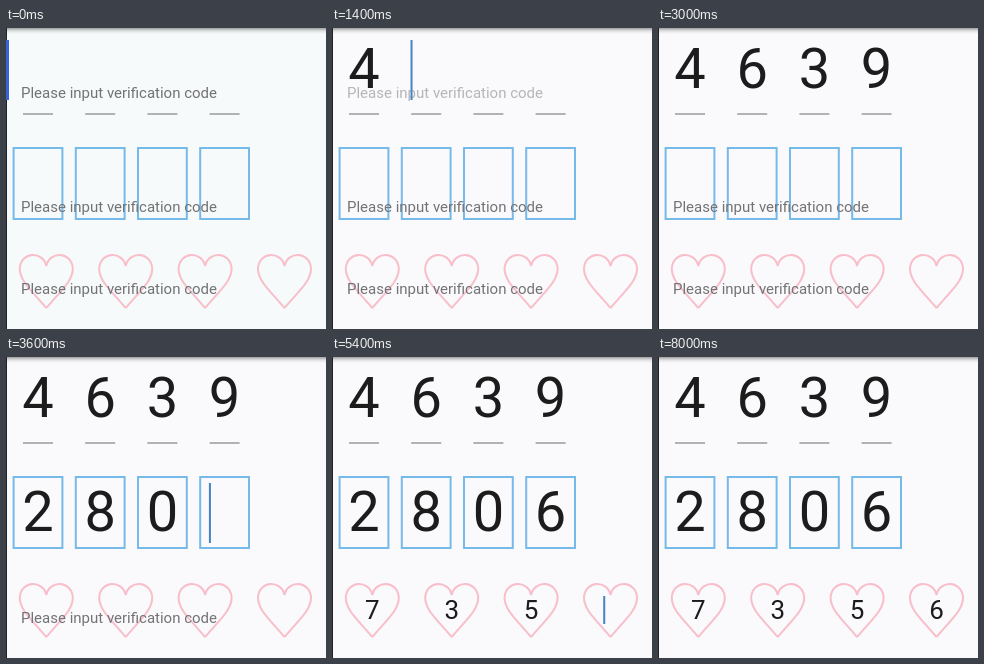
These frames come from a looping animation (320 by 301 pixels, 8100 ms). An HTML page with a canvas:

```html
<!DOCTYPE html>
<html lang="en">
<head>
<meta charset="utf-8">
<title>Verification code inputs</title>
<style>
html, body { margin: 0; width: 100%; height: 100%; overflow: hidden; background: #faf9fb; }
canvas { display: block; width: 320px; height: 301px; }
</style>
</head>
<body>
<canvas id="stage"></canvas>
<script>
const W = 320, H = 301, LOOP = 8100, STEP = 100;
const HINT = 'Please input verification code';
const canvas = document.getElementById('stage');
const ctx = canvas.getContext('2d');
const dpr = window.devicePixelRatio || 1;
canvas.width = W * dpr;
canvas.height = H * dpr;
ctx.scale(dpr, dpr);

// Each field: typed text, key times, cursor-on spans, layout
const rows = [
  { text: '4639', keys: [1300, 1500, 1700, 1800], fade: 1300, on: [[0, 400], [900, 2000]],
    x: 32, pitch: 62.2, size: 56, base: 60, hint: 69.5, top: 12, tall: 60, frame: underline },
  { text: '2806', keys: [3200, 3400, 3600, 3800], fade: 3200, on: [[2300, 2800], [3200, 4300]], tap: 2300,
    x: 32, pitch: 62.2, size: 56, base: 174, hint: 183.5, top: 126, tall: 60, frame: box },
  { text: '7356', keys: [5000, 5100, 5400, 5600], fade: 4910, on: [[4300, 4800], [5000, 5600]], tap: 4300,
    x: 40.3, pitch: 79.4, size: 26, base: 262, hint: 265.5, top: 239, tall: 28, frame: heart }
];

function underline(x) {
  ctx.fillStyle = '#b2b1b3';
  ctx.fillRect(x - 15, 85, 30, 2);
}

function box(x) {
  ctx.strokeStyle = '#76baea';
  ctx.lineWidth = 2;
  ctx.strokeRect(x - 24.4, 120, 48.8, 71);
}

function heart(x) {
  ctx.strokeStyle = '#f8bfcb';
  ctx.lineWidth = 2;
  ctx.beginPath();
  ctx.moveTo(x, 238);
  for (const s of [-1, 1]) {
    ctx.moveTo(x, 238);
    ctx.bezierCurveTo(x + s * 3, 223, x + s * 25, 223, x + s * 26.5, 240);
    ctx.bezierCurveTo(x + s * 27, 253, x + s * 14, 263, x, 280);
  }
  ctx.stroke();
}

function label(text, x, y, size, color) {
  ctx.font = size + 'px Roboto, sans-serif';
  ctx.fillStyle = color;
  ctx.fillText(text, x, y);
}

function disc(x, y, r, color) {
  ctx.fillStyle = color;
  ctx.beginPath();
  ctx.arc(x, y, r, 0, Math.PI * 2);
  ctx.fill();
}

function splash(row, t) {
  const age = t - row.tap;
  if (!(age >= 0 && age < 300)) return;
  const mid = row.top + row.tall / 2;
  ctx.save();
  ctx.beginPath();
  ctx.rect(1, row.top - 14, W, row.tall + 29);
  ctx.clip();
  disc(36, mid, 24 + age * 0.24, '#ededee');
  disc(38, mid - 5, 13, '#f3f2f4');
  ctx.restore();
}

function drawRow(row, t) {
  splash(row, t);
  for (let i = 0; i < 4; i++) row.frame(row.x + i * row.pitch);

  const typed = row.keys.filter(k => t >= k).length;
  const alpha = Math.min(1, Math.max(0, 1 - (t - row.fade) / 200));
  ctx.globalAlpha = alpha;
  ctx.textAlign = 'left';
  if (alpha > 0) label(HINT, 15, row.hint, 15, '#737274');
  ctx.globalAlpha = 1;

  ctx.textAlign = 'center';
  for (let i = 0; i < typed; i++) {
    label(row.text[i], row.x + i * row.pitch, row.base, row.size, '#1c1c1c');
  }

  if (row.on.some(([a, b]) => t >= a && t < b)) {
    if (typed) {
      ctx.fillStyle = '#4585c4';
      ctx.fillRect(row.x + typed * row.pitch - row.size * 0.28, row.top, 2, row.tall);
    } else {
      ctx.fillStyle = '#3865d6';
      ctx.fillRect(0, row.top, 3, row.tall);
    }
  }
}

function draw(t) {
  const k = Math.min(1, t / 1000);
  ctx.fillStyle = `rgb(${246 + 4 * k}, ${250 - k}, ${250 + k})`;
  ctx.fillRect(0, 0, W, H);
  const shade = ctx.createLinearGradient(0, 0, 0, 6);
  shade.addColorStop(0, 'rgba(0,0,0,.36)');
  shade.addColorStop(0.5, 'rgba(0,0,0,.1)');
  shade.addColorStop(1, 'rgba(0,0,0,0)');
  ctx.fillStyle = shade;
  ctx.fillRect(0, 0, W, 6);
  ctx.fillStyle = '#222';
  ctx.fillRect(0, 0, 1, H);
  for (const row of rows) drawRow(row, t);
}

const start = performance.now();
function tick() {
  const t = (performance.now() - start) % LOOP;
  draw(Math.floor(t / STEP) * STEP);
  requestAnimationFrame(tick);
}
tick();
</script>
</body>
</html>
```
